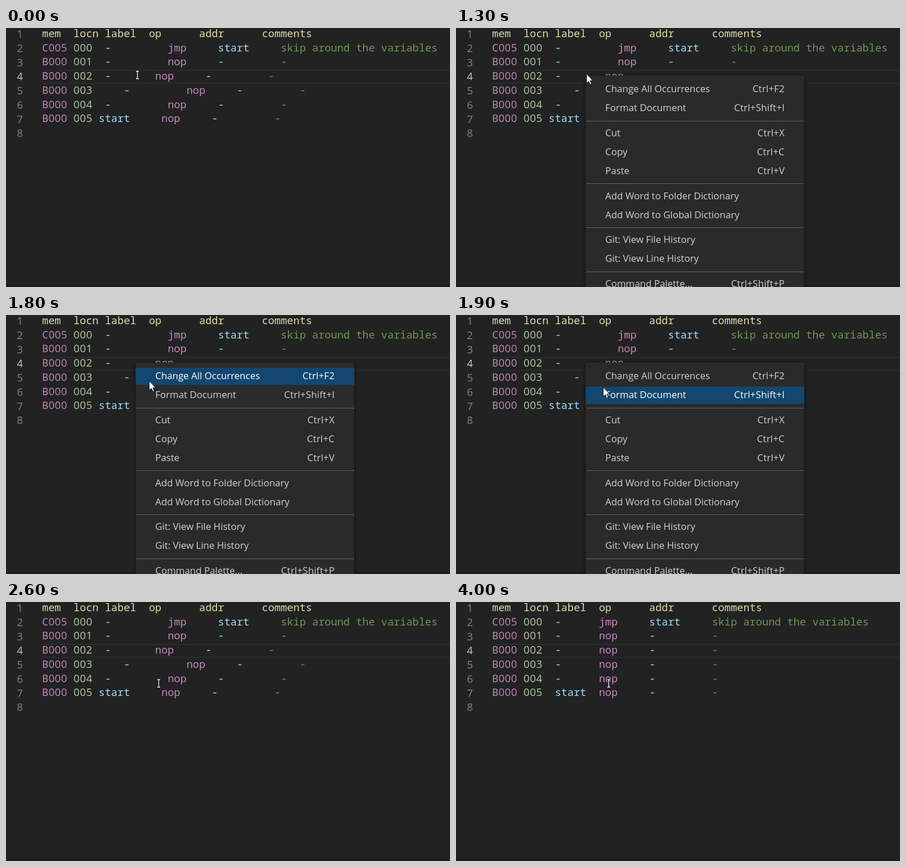
Recreate the animation shown at these times as an HTML page. Size 772 px wide and 452 px high, loop 4400 ms.

```html
<!DOCTYPE html>
<html lang="en">
<head>
<meta charset="utf-8">
<title>Format document</title>
<style>
  html, body { margin: 0; width: 100%; height: 100%; overflow: hidden; background: #222; }
  svg { display: block; width: 772px; height: 452px; }
  .mono { font: 18.2px "Noto Sans Mono", "DejaVu Sans Mono", monospace; }
  /* plain zeros on the same 0.6em grid as the mono text */
  .digits { font: 18.2px "Open Sans", "Noto Sans", sans-serif; letter-spacing: .028em; }
  .menu, .key { font: 16.55px "Open Sans", "Noto Sans", sans-serif; }
  .key { letter-spacing: .012em; }
</style>
</head>
<body>
<svg id="stage" viewBox="0 0 772 452">
  <defs>
    <filter id="shadow" x="-10%" y="-10%" width="120%" height="120%">
      <feDropShadow dx="0" dy="2" stdDeviation="3.5" flood-color="#000" flood-opacity=".75"/>
    </filter>
  </defs>
  <rect width="772" height="452" fill="#222"/>
  <rect y="448" width="772" height="4" fill="#25191f"/>
  <path d="M63 74H772M63 96.5H772" stroke="#2b2b2b" stroke-width="2"/>
  <g id="code"></g>
  <g id="before"></g>
  <g id="after"></g>
  <rect id="caret" x="227" y="73" width="2" height="24.5" fill="#aeafad"/>
  <g id="menu">
    <rect x="225.5" y="83" width="380" height="400" fill="#292929" filter="url(#shadow)"/>
    <rect id="pick" x="225.5" width="380" height="30" fill="#13476f"/>
    <path d="M226 162.5H605.5M226 271.5H605.5M226 348.5H605.5M226 425.5H605.5" stroke="#606060"/>
  </g>
  <path id="arrow" d="M0 0V16.5L3.7 13L6.3 18.6L8.8 17.5L6.2 12H11.2Z" fill="#fff" stroke="#111" stroke-width="1"/>
  <g id="beam" fill="none">
    <path d="M-3 -6.5H3M0 -6.5V6.5M-3 6.5H3" stroke="#111" stroke-width="3"/>
    <path d="M-2.5 -6.5H2.5M0 -6.5V6.5M-2.5 6.5H2.5" stroke="#fff" stroke-width="1.3"/>
  </g>
</svg>
<script>
const $ = id => document.getElementById(id);
const X0 = 62.75, PITCH = 10.92, LINE = 24.7;
const HEAD = '#dcdcaa', PINK = '#c586c0', NUM = '#b5cea8', BLUE = '#9cdcfe', GREEN = '#6a9955';
const ITEM = '#d2d2d2';

function text(parent, str, x, y, fill, cls, anchor = 'start') {
  const el = document.createElementNS('http://www.w3.org/2000/svg', 'text');
  Object.entries({ x, y, fill, class: cls, 'text-anchor': anchor })
    .forEach(([k, v]) => el.setAttribute(k, v));
  el.textContent = str;
  parent.append(el);
  return el;
}
const baseline = (top, row) => Math.round(top + row * LINE);
const put = (parent, str, col, row, fill, cls = 'mono') =>
  text(parent, str, X0 + col * PITCH + (cls === 'digits' ? 0.25 : 0), baseline(16.05, row), fill, cls);

// fields of each line, then their columns before formatting
const GRID = [10, 17, 25, 35];
const rows = [
  ['C', '005', ['-', 'jmp', 'start', 'skip around the variables'], [10, 20, 28, 38]],
  ['B', '000', ['-', 'nop', '-', '-'], [10, 20, 28, 38]],
  ['B', '000', ['-', 'nop', '-', '-'], [10, 18, 26, 36]],
  ['B', '000', ['-', 'nop', '-', '-'], [13, 23, 31, 41]],
  ['B', '000', ['-', 'nop', '-', '-'], [10, 20, 28, 38]],
  ['B', '000', ['start', 'nop', '-', '-'], [9, 19, 27, 37]]
];
const colors = [BLUE, PINK, BLUE, GREEN];

['mem', 'locn', 'label', 'op', 'addr', 'comments']
  .forEach((s, i) => put($('code'), s, [0, 5, ...GRID][i], 0, HEAD));
for (let i = 0; i < 8; i++)
  text($('code'), i + 1, 19, baseline(17.35, i), i === 3 ? '#c6c6c6' : '#858585', 'digits');
rows.forEach(([op, word, fields, cols], i) => {
  const row = i + 1;
  put($('code'), op, 0, row, PINK);
  put($('code'), word, 1, row, PINK, 'digits');
  put($('code'), '00' + i, 5, row, NUM, 'digits');
  fields.forEach((s, k) => {
    put($('before'), s, cols[k], row, colors[k]);
    put($('after'), s, GRID[k], row, colors[k]);
  });
});

const items = [
  ['Change All Occurrences', 106, 'Ctrl+F2'], ['Format Document', 139, 'Ctrl+Shift+I'],
  ['Cut', 183, 'Ctrl+X'], ['Copy', 216, 'Ctrl+C'], ['Paste', 249, 'Ctrl+V'],
  ['Add Word to Folder Dictionary', 293], ['Add Word to Global Dictionary', 326],
  ['Git: View File History', 369], ['Git: View Line History', 402],
  ['Command Palette...', 446, 'Ctrl+Shift+P']
].map(([name, y, key]) => [
  text($('menu'), name, 259.5, y + 6, ITEM, 'menu'),
  text($('menu'), key || '', 571.5, y + 6, ITEM, 'key', 'end')
]);

// pointer tip at 100 ms steps from 1400 to 2100
const path = [[227, 80], [228, 81], [232, 87], [240, 100], [249, 115], [256, 126], [261, 135], [264, 140]];

const show = (id, on) => $(id).setAttribute('visibility', on ? 'visible' : 'hidden');
const move = (id, x, y) => $(id).setAttribute('transform', `translate(${x} ${y})`);
const within = (t, a, b) => t >= a && t < b;

function draw(t) {
  const open = within(t, 1300, 2600), arrow = within(t, 1300, 2500), done = t >= 2700;
  const step = Math.max(0, Math.min(7, Math.floor((t - 1400) / 100)));
  const [x, y] = path[step];
  const picked = y < 91 ? -1 : y < 125 ? 0 : 1;

  show('before', !done);
  show('after', done);
  show('caret', within(t, 400, 900) || within(t, 3600, 4000));
  show('menu', open);
  show('pick', open && picked >= 0);
  $('pick').setAttribute('y', picked === 1 ? 125 : 92);
  items.forEach((pair, i) => pair.forEach(el => el.setAttribute('fill', i === picked ? '#fff' : ITEM)));
  // menu texts inherit visibility from the group

  show('arrow', arrow);
  move('arrow', x, y);
  show('beam', !arrow);
  move('beam', t < 1300 ? 228.5 : 265.5, t < 1300 ? 82 : 142);
}

let start;
function tick(now) {
  start ??= now;
  draw((now - start) % 4400);
  requestAnimationFrame(tick);
}
draw(0);
requestAnimationFrame(tick);
</script>
</body>
</html>
```
